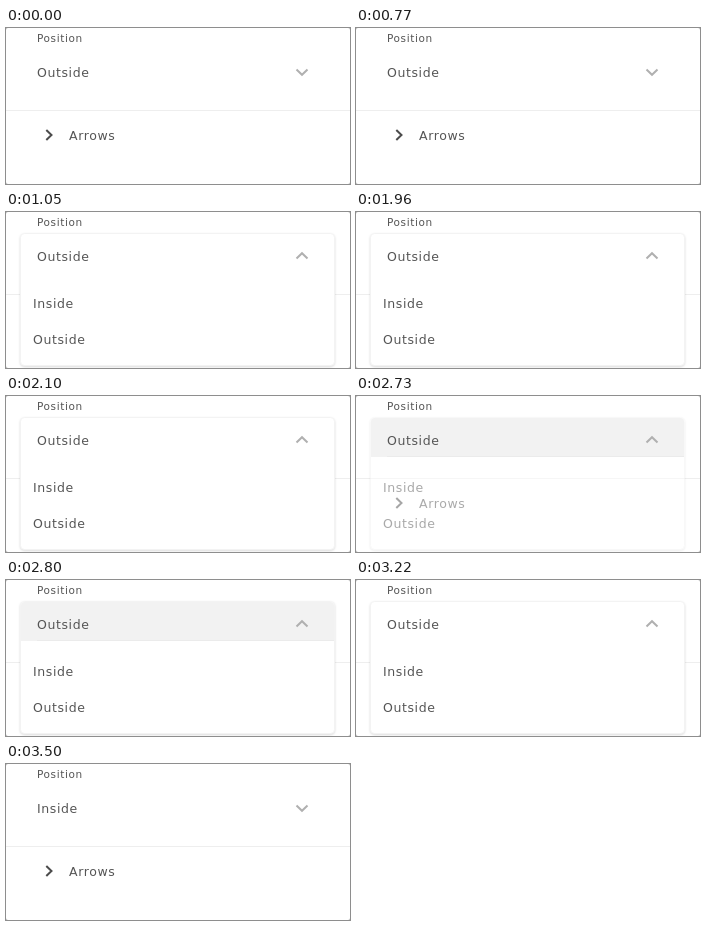
An HTML page for the animation above (3.92 s loop, 344 px wide and 156 px high).

```html
<!DOCTYPE html>
<html>
<head>
<meta charset="utf-8">
<style>
html, body { margin: 0; width: 100%; height: 100%; overflow: hidden; background: #aaa; }
svg { display: block; }
text { font: 12.5px "DejaVu Sans", sans-serif; letter-spacing: .6px; fill: #555; }
.label { font-size: 10.5px; }
path { fill: none; }
#panel { filter: drop-shadow(0 1px 1px rgba(0, 0, 0, .14)); }
</style>
</head>
<body>
<svg width="344" height="156" viewBox="0 0 344 156">
  <rect width="344" height="156" rx="2" fill="#fff"/>
  <path d="M0 82.5H344" stroke="#eee"/>
  <path d="M40.3 102l5.2 5-5.2 5" stroke="#4c4c4c" stroke-width="2"/>
  <text x="63" y="112">Arrows</text>
  <text class="label" x="31" y="14">Position</text>
  <g id="menu">
    <rect id="panel" x="14.5" y="21.5" width="314" height="132" rx="4" fill="#fff" stroke="#f3f3f3"/>
    <text x="27" y="96">Inside</text>
    <text x="27" y="132">Outside</text>
  </g>
  <g id="hover">
    <path d="M15 61V26q0-4 4-4H324q4 0 4 4V61z" style="fill:#f2f2f2"/>
    <path d="M31 60.5H328" stroke="#ebebeb"/>
  </g>
  <text id="value" x="31" y="49"></text>
  <path id="chevron" stroke="#b0b0b0" stroke-width="2"/>
</svg>
<script>
const LOOP = 3920;
const $ = id => document.getElementById(id);

// [start ms, menu opacity, header hover, value]
const states = [
  [0, 0, 0, "Outside"],
  [980, 1, 1, "Outside"],
  [1050, 1, 0, "Outside"],
  [2380, 0, 0, "Outside"],
  [2730, .5, 1, "Outside"],
  [2800, 1, 1, "Outside"],
  [2870, 1, 0, "Outside"],
  [3500, 0, 0, "Inside"]
];

let current;
function draw(now) {
  const t = now % LOOP;
  const state = states.findLast(s => s[0] <= t);
  if (state === current) return;
  current = state;
  const [, open, hover, value] = state;
  $("menu").setAttribute("opacity", open);
  $("hover").setAttribute("opacity", hover);
  $("value").textContent = value;
  $("chevron").setAttribute("d", open ? "M290.5 46.5l5.5-5.3 5.5 5.3" : "M290.5 41.5l5.5 5.3 5.5-5.3");
}

const start = performance.now();
function frame() {
  draw(performance.now() - start);
  requestAnimationFrame(frame);
}
frame();
</script>
</body>
</html>
```
